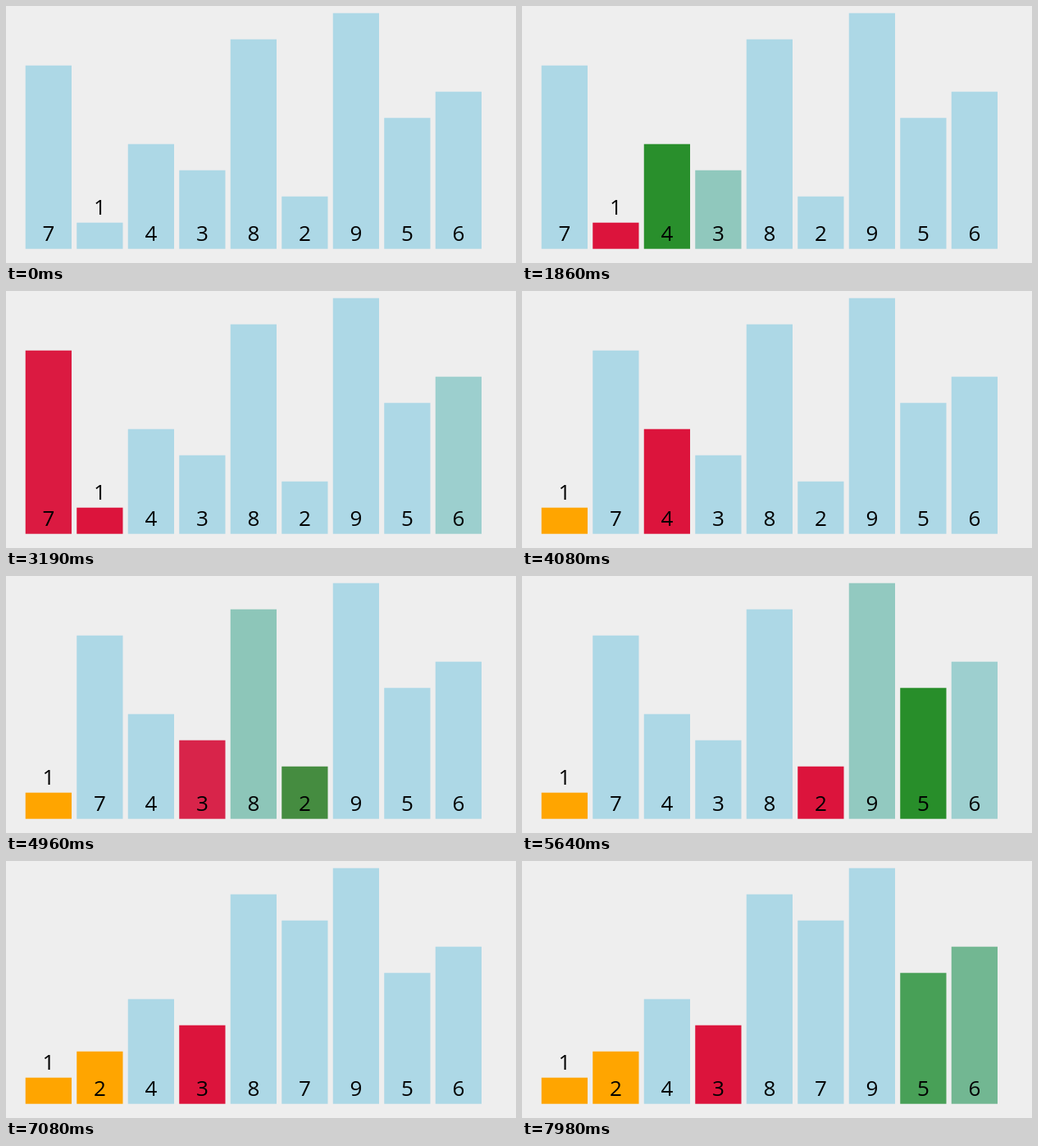
These frames come from a looping animation (622 px wide and 314 px high, 8000 ms). An HTML page:

```html
<!DOCTYPE html>
<html lang="en">
<head>
<meta charset="utf-8">
<title>Selection sort</title>
<style>
  html, body { margin: 0; width: 100%; height: 100%; overflow: hidden; background: #eee; }
  svg { display: block; width: 622px; height: 314px; }
  text { font: 26px "Open Sans", "Noto Sans", sans-serif; text-anchor: middle; }
</style>
</head>
<body>
<svg viewBox="0 0 622 314"></svg>
<script>
const LOOP = 8000;
const LEFT = 23.75, PITCH = 62.5, WIDTH = 56.25, BOTTOM = 296.7, UNIT = 32;
const BLUE = [173, 216, 230], GREEN = [34, 139, 34], RED = [220, 20, 60], ORANGE = [255, 165, 0];

// Durations in ms
const FADE = 225, STEP = 190, NEW_MIN_STEP = 460;
const MIN_LEAD = 100, PAIR_DELAY = 205, SWAP_DELAY = 424;
const PASS_STARTS = [1160, 3655, 6670];

// The picture advances in coarse ticks, in runs of eight
const RUNS = [1080, 1980, 2850, 3750, 4640, 5520, 6420, 7320];
const TICK = 111, TICK_SLACK = 15;

const svg = document.querySelector("svg");
const add = (parent, name, attributes) => {
  const node = document.createElementNS("http://www.w3.org/2000/svg", name);
  for (const key in attributes) node.setAttribute(key, attributes[key]);
  return parent.appendChild(node);
};

const bars = [7, 1, 4, 3, 8, 2, 9, 5, 6].map((value, index) => {
  const group = add(svg, "g", {});
  const height = value * UNIT;
  const rect = add(group, "rect", { y: BOTTOM - height, width: WIDTH, height });
  const label = add(group, "text", { x: WIDTH / 2, y: value === 1 ? 255 : 287 });
  label.textContent = value;
  return { value, group, rect, colors: [], moves: [], home: [LEFT + PITCH * index], base: BLUE };
});

const paint = (bar, time, color) => bar.colors.push({ time, to: color });
const move = (bar, time, slot) => bar.moves.push({ time, to: [LEFT + PITCH * slot] });

function schedulePass(order, first, start) {
  let time = start, min = first;
  paint(order[first], start - MIN_LEAD, RED);
  for (let i = first + 1; i < order.length; i++) {
    const bar = order[i];
    paint(bar, time, GREEN);
    const smaller = bar.value < order[min].value;
    if (smaller) {
      paint(order[min], time + STEP, BLUE);
      paint(bar, time + STEP, RED);
      min = i;
    } else {
      paint(bar, time + FADE, BLUE);
    }
    if (i < order.length - 1) time += smaller ? NEW_MIN_STEP : STEP;
  }

  const displaced = order[first], smallest = order[min];
  const swapTime = time + SWAP_DELAY;
  paint(displaced, time + PAIR_DELAY, RED);
  move(displaced, swapTime, min);
  move(smallest, swapTime, first);
  paint(displaced, swapTime + FADE, BLUE);
  paint(smallest, swapTime + FADE, ORANGE);
  order[first] = smallest;
  order[min] = displaced;
}

const order = [...bars];
PASS_STARTS.forEach((start, first) => schedulePass(order, first, start));

// Linear changes; each one starts from wherever the previous one had got to
function valueAt(initial, changes, time) {
  let current = initial;
  changes.forEach(({ time: start, to }, i) => {
    const end = Math.min(time, changes[i + 1]?.time ?? Infinity);
    const progress = Math.min(Math.max((end - start) / FADE, 0), 1);
    current = current.map((from, n) => from + (to[n] - from) * progress);
  });
  return current;
}

function tickTime(time) {
  const start = RUNS.findLast(run => run <= time);
  if (start === undefined) return 0;
  return start + TICK * Math.min(7, Math.floor((time - start + TICK_SLACK) / TICK));
}

function draw() {
  const time = tickTime(performance.now() % LOOP);
  for (const { group, rect, colors, moves, home, base } of bars) {
    group.setAttribute("transform", `translate(${valueAt(home, moves, time)[0]} 0)`);
    rect.setAttribute("fill", `rgb(${valueAt(base, colors, time).map(Math.round)})`);
  }
  requestAnimationFrame(draw);
}
draw();
</script>
</body>
</html>
```
